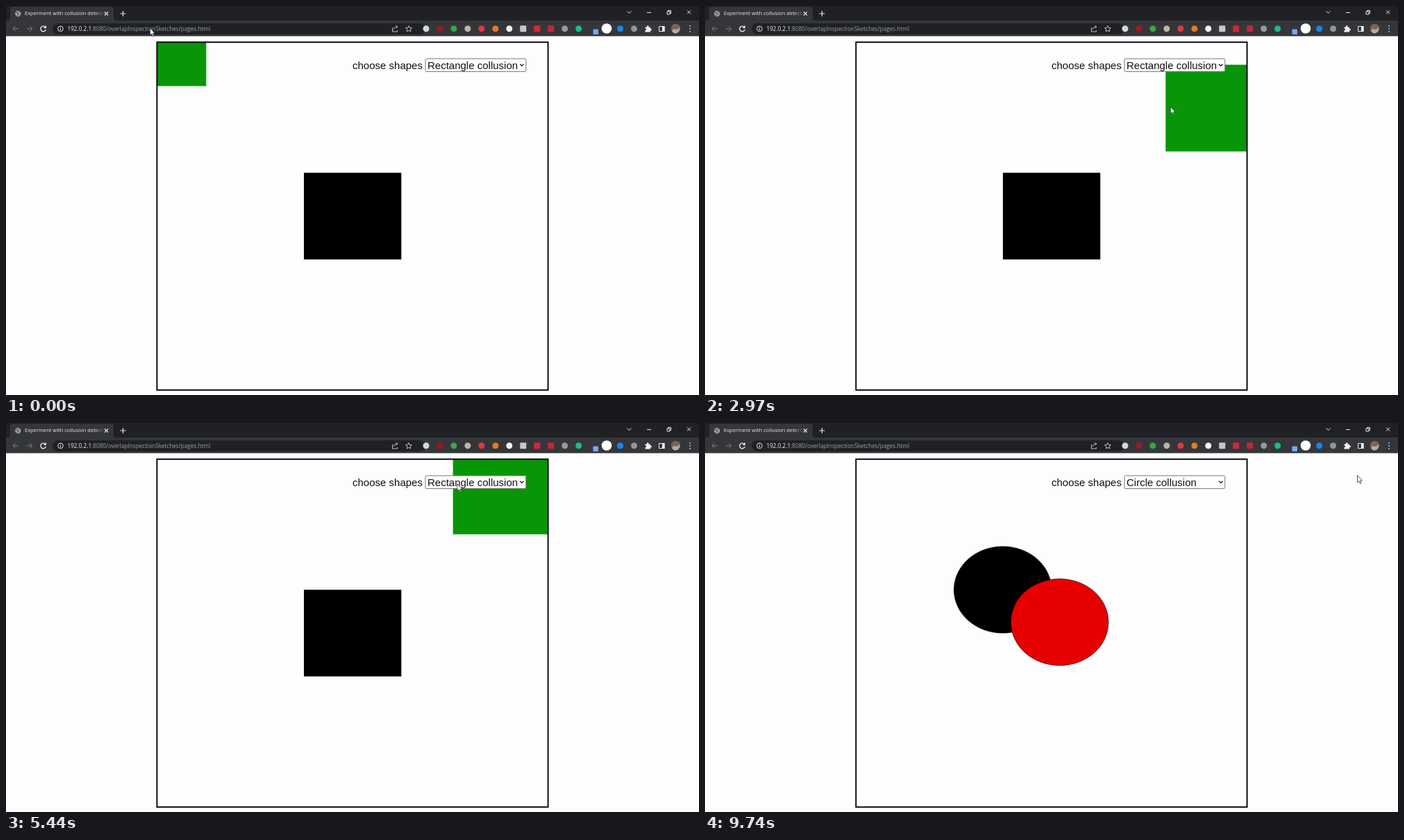
These frames come from a looping animation (998x561 px, 9.9 s). An HTML page:

```html
<!DOCTYPE html>
<html lang="en">
<head>
<meta charset="utf-8">
<title>Collision shapes</title>
<style>
  html, body { margin: 0; width: 100%; height: 100%; overflow: hidden; background: #fdfdfd; }
  svg { display: block; }
  .ui { font-family: "Open Sans", "Noto Sans", sans-serif; }
  .page { font: 15px "Liberation Sans", Arial, sans-serif; fill: #111; }
  .line { fill: none; stroke: #e8eaed; }
</style>
</head>
<body>
<svg width="998" height="561" viewBox="0 0 998 561">
  <defs>
    <clipPath id="inside"><rect x="218" y="53" width="562" height="500"/></clipPath>
    <linearGradient id="fade">
      <stop offset=".88" stop-color="#e8eaed"/>
      <stop offset="1" stop-color="#e8eaed" stop-opacity=".1"/>
    </linearGradient>
  </defs>

  <!-- Page -->
  <rect width="998" height="561" fill="#fdfdfd"/>
  <g clip-path="url(#inside)">
    <g id="boxes">
      <rect x="429" y="240.5" width="140.3" height="125"/>
      <rect id="box" width="140.5" height="125"/>
    </g>
    <g id="discs" stroke="#000" stroke-width=".6">
      <ellipse cx="428.8" cy="240.5" rx="70.3" ry="62.5"/>
      <ellipse id="disc" rx="70.3" ry="62.5"/>
    </g>
  </g>
  <rect x="217.4" y="52.2" width="563.2" height="501.6" fill="none" stroke="#0b0b14" stroke-width="2"/>
  <g class="page">
    <text x="499" y="90.7">choose shapes</text>
    <rect id="ring" x="603" y="75" width="146.600" height="20.500" rx="2" stroke="#fff" stroke-width="3"/>
    <rect id="field" x="604" y="76" width="144.800" height="18.600" rx="1.500" fill="#fff"/>
    <text id="choice" x="607" y="90.700"></text>
    <path d="M740.300 83.800l2.600 2.600 2.600-2.600" fill="none" stroke="#111" stroke-width="1.300"/>
  </g>

  <!-- Browser bar -->
  <rect width="998" height="43.500" fill="#35363a"/>
  <rect width="998" height="21" fill="#202124"/>
  <path d="M2 21q4 0 4-4V5q0-4 4-4h141q4 0 4 4v12q0 4 4 4z" fill="#35363a"/>
  <circle cx="17.300" cy="11" r="4.200" fill="#9aa0a6"/>
  <path d="M14 9l3 1 1 2-2 2M18 7l2 2" fill="none" stroke="#35363a"/>
  <g class="ui">
    <text x="27" y="13.400" font-size="7.500" fill="url(#fade)">Experment with collusion detecti</text>
    <rect x="67" y="25" width="537" height="16" rx="8" fill="#202124"/>
    <text x="88.500" y="35.800" font-size="8.200" fill="#9aa0a6"><tspan fill="#f1f3f4">192.0.2.1</tspan>:8080/overlapInspectionSketches/pages.html</text>
  </g>
  <g class="line">
    <path d="M142 8.500l5 5m0-5l-5 5M164.500 11h8M168.500 7v8" stroke-width="1.200"/>
    <path d="M894.500 7.500l3 3 3-3M923 9.500h6M952 8h4v4h-4zM953.500 8V6.500h4v4H956M981 6.500l5 5m0-5l-5 5"/>
    <path d="M18 32.800H10m3.800-3.800L10 32.800l3.800 3.800M30 32.800h8m-3.800-3.800l3.800 3.800-3.800 3.800" stroke="#7d8085"/>
    <path d="M56.600 30.500A3.800 3.800 0 1 0 57.300 34M57.300 28.500v2.800h-2.800" stroke-width="1.400"/>
    <circle cx="78.500" cy="32.800" r="3.800"/>
    <path d="M78.500 32.200v2.800m0-4.500v.8"/>
    <path d="M556.500 31v6h7v-2M558.500 34q0-4 5-4m-2-2l2.500 2-2.500 2" stroke="#bdc1c6"/>
    <path d="M580 28.500l1.300 2.900 3.200.3-2.400 2.100.7 3.100-2.800-1.600-2.800 1.600.7-3.100-2.400-2.100 3.200-.3z" stroke="#bdc1c6"/>
  </g>
  <g id="icons"></g>
  <rect x="845.500" y="33.500" width="7.500" height="7.500" rx="1" fill="#76a7f7"/>
  <circle cx="865" cy="32.500" r="7.300" fill="#fff"/>
  <path d="M920.500 30.500h2.500q-.5-2.500 1.200-2.500t1.200 2.500h2.600v2.300q2-.3 2 1.200t-2 1.200v2.300h-7.500v-2.500q1.800 0 1.800-1.200t-1.800-1.200z" fill="#f1f3f4"/>
  <path d="M940.500 29.500h7.500v7h-7.500z" class="line"/>
  <path d="M945 29h3.500v8H945z" fill="#f1f3f4"/>
  <circle cx="964.500" cy="32.500" r="6.800" fill="#74645a"/>
  <path d="M959 36.500q2-5 5-3t6-3q1 5-3 8t-8-2z" fill="#bba99a"/>
  <path d="M985 28.800h.01m-.01 4h.01m-.01 4h.01" stroke="#e8eaed" stroke-width="1.800" stroke-linecap="round"/>

  <path id="pointer" d="M0 0v10.200l2.300-2.100 1.700 3.700 1.700-.8-1.700-3.500h3z" fill="#fff" stroke="#222733" stroke-width=".8"/>
</svg>

<script>
const LOOP = 9900, LEFT = 218, TOP = 53, RIGHT = 780;
const HIT = 1330, RELOAD = 2700, PARK = 5400, SWITCH = 6500, RESUME = 6650, END = 7880;
const GREEN = "#099508", RED = "#e70000";
const el = id => document.getElementById(id);
const set = (id, attrs) => {
  for (const name in attrs) el(id).setAttribute(name, attrs[name]);
};
const show = (id, on) => set(id, { visibility: on ? "visible" : "hidden" });

// Extension icons sit 20px apart; * marks a square one.
el("icons").innerHTML =
  "#d5d8db #a01922 #39a647 #b9b6aa #df3943 #e77a20 #f4f4f4 *#c5c7c9 *#d52635 *#bd2837 #97999d #17bf87 none none #1687ed #92969b"
    .split(" ").map((color, i) =>
      `<rect x="${600.5 + 19.97 * i}" y="28.3" width="9" height="9" rx="${color[0] == "*" ? 1 : 4.5}" fill="${color.replace("*", "")}"/>`
    ).join("");

// Each leg eases the pointer from where it rests to a new point, on an arc bent towards (bx, by).
const home = { x: 207.5, y: 32 };
const legs = [];
function move(start, end, x, y, bx, by) {
  const from = legs.length ? legs[legs.length - 1].to : home;
  const bend = { x: bx ?? (from.x + x) / 2, y: by ?? (from.y + y) / 2 };
  legs.push({ start, end, from, bend, to: { x, y } });
}

// Drag the rectangle into the middle, then leave it stuck there.
move(850, HIT, 420.6, 212);
move(1500, 2150, 622.5, 208);
move(2290, RELOAD, 819, 180);
// Circle round the middle and stop on the list.
move(2800, 3590, 323, 409, 150, 0);
move(3640, 4470, 690, 175, 700, 700);
move(4470, PARK, 653, 96, 430, 40);
move(PARK, 5435, 650, 88);
move(5800, 6450, 633, 125);
// Bring the circle in, then leave the stage.
move(RESUME, END, 506, 316.5, 850, 330);
move(8050, 8740, 711, 122, 600, 60);
move(8910, 9070, 903, 98);
move(9270, 9470, 946, 66);
move(9610, 9740, 939.5, 75.5);

function pointerAt(t) {
  const leg = legs.findLast(l => l.start <= t);
  if (!leg) return home;
  const k = Math.min(1, (t - leg.start) / (leg.end - leg.start));
  const u = k * k * (3 - 2 * k);
  const arc = axis => (1 - u) ** 2 * leg.from[axis] + 2 * u * (1 - u) * leg.bend[axis] + u * u * leg.to[axis];
  return { x: arc("x"), y: arc("y") };
}

// The shape follows the pointer until it collides or the pointer leaves the stage.
function followTime(t) {
  if (t < RELOAD) return Math.min(t, HIT);
  if (t < RESUME) return Math.min(t, PARK);
  return Math.min(t, END);
}

function shapeAt(t) {
  const { x, y } = pointerAt(followTime(t));
  if (x > RIGHT) return [LEFT, TOP];
  return [LEFT + 1.14 * Math.max(0, x - LEFT), Math.max(TOP, y + 2)];
}

function draw(t) {
  const round = t >= SWITCH;
  const focused = round && t < 7000;
  let [x, y] = shapeAt(t);
  if (round) {
    x -= 35.6;
    y -= 31.3;
    const hit = Math.hypot((x - 428.8) / 140.6, (y - 240.5) / 125) < 1;
    set("disc", { cx: x, cy: y, fill: hit ? RED : GREEN });
  } else {
    const hit = Math.abs(x - 499) < 140 && Math.abs(y - 303) < 125;
    set("box", { x: x - 70.2, y: y - 62.5, fill: hit ? RED : GREEN });
  }
  show("boxes", !round);
  show("discs", round);
  show("ring", focused);
  set("field", { stroke: focused ? "#101010" : "#767676", "stroke-width": focused ? 1.7 : 1 });
  el("choice").textContent = (round ? "Circle" : "Rectangle") + " collusion";
  const p = pointerAt(t);
  set("pointer", { transform: `translate(${p.x} ${p.y})` });
}

const start = performance.now();
function tick() {
  draw((performance.now() - start) % LOOP);
  requestAnimationFrame(tick);
}
tick();
</script>
</body>
</html>
```
